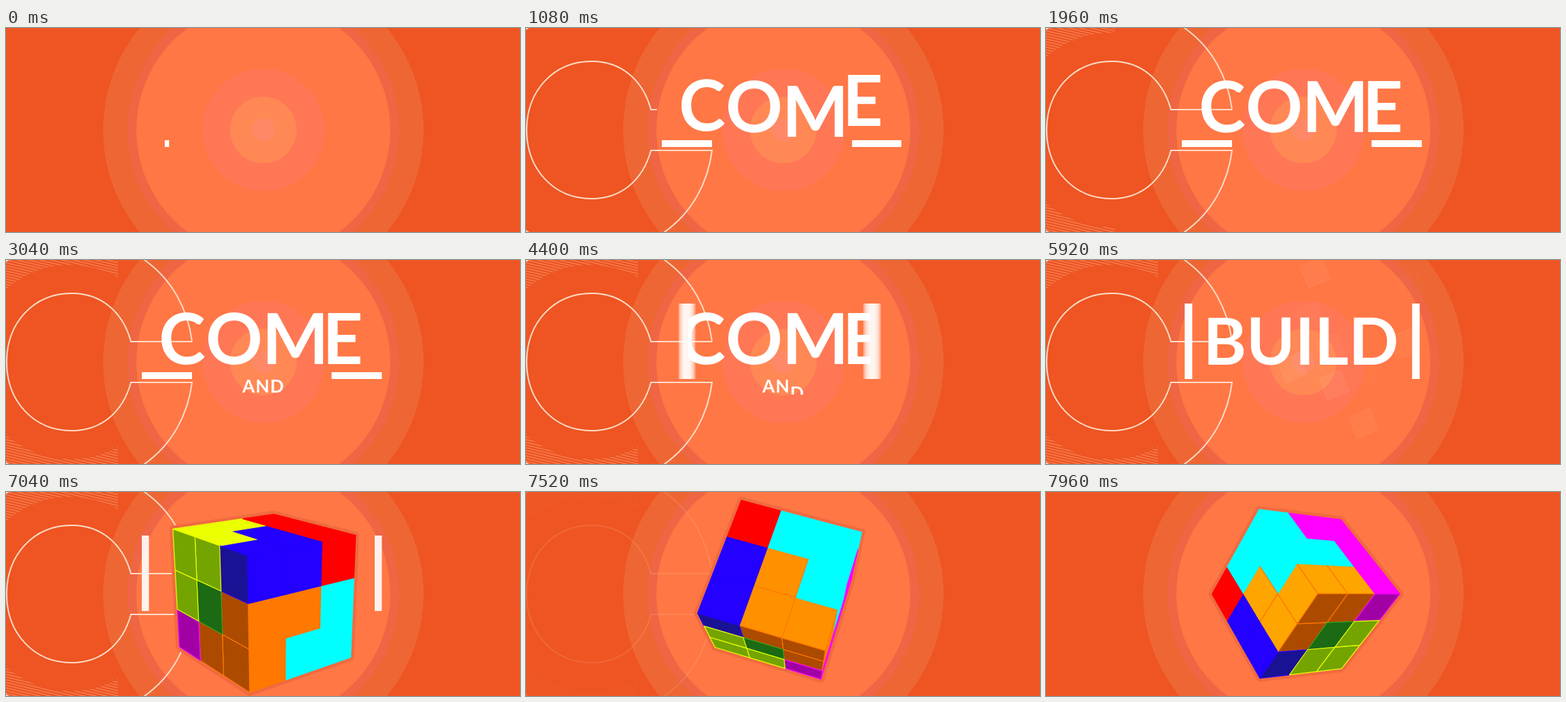
Write an HTML page with a canvas that moves like this. It is 757 by 300 pixels and loops after 8 s.

```html
<!DOCTYPE html>
<html lang="en">
<head>
<meta charset="utf-8">
<title>Come and build</title>
<style>
  html, body { margin: 0; width: 100%; height: 100%; overflow: hidden; background: #ee5522; }
  canvas { display: block; }
</style>
</head>
<body>
<canvas id="stage" width="757" height="300"></canvas>
<script>
const LOOP = 8000;
const ctx = document.getElementById('stage').getContext('2d');

const clamp = v => Math.min(1, Math.max(0, v));
const span = (t, from, to) => clamp((t - from) / (to - from));
const mix = (a, b, k) => a + (b - a) * k;
const easeInOut = k => (1 - Math.cos(Math.PI * k)) / 2;
const easeOut = k => 1 - (1 - k) ** 3;
const ring = (x, decay, period) => Math.exp(-x / decay) * Math.cos(2 * Math.PI * x / period);

function layer(alpha, draw) {
  if (alpha <= 0) return;
  ctx.save();
  ctx.globalAlpha = alpha;
  draw();
  ctx.restore();
}

function clipRect(x, y, w, h) {
  ctx.beginPath();
  ctx.rect(x, y, w, h);
  ctx.clip();
}

// Places a glyph by the left edge of its ink.
function glyph(char, left, baseline) {
  ctx.fillText(char, left + ctx.measureText(char).actualBoundingBoxLeft, baseline);
}

const setFont = size => { ctx.font = `700 ${size}px Lato, sans-serif`; };

/* ---------- backdrop ---------- */

const DISCS = [[236, '#ee6633'], [200, '#ee6644'], [187, '#ff7744'],
               [90, '#ff7755'], [49, '#ff8855'], [17, '#ff8866']];

function drawBackdrop() {
  ctx.fillStyle = '#ee5522';
  ctx.fillRect(0, 0, 757, 300);
  for (const [radius, color] of DISCS) {
    ctx.fillStyle = color;
    ctx.beginPath();
    ctx.arc(379, 150, radius, 0, 7);
    ctx.fill();
  }
}

/* ---------- outlined C and hatching ---------- */

const OUTLINE_LENGTH = 1815;
const outline = new Path2D('M274 120H184C172 76 140 49 97 49C40 49 1 93 1 150' +
  'C1 207 40 251 97 251C140 251 172 224 184 180H274C268 227 245 271 204 300' +
  'C90 380-86 290-86 150C-86 10 90-80 204 0C245 29 268 73 274 120');

function drawOutline(t) {
  const k = easeInOut(span(t, 200, 1480));
  if (!k) return;
  ctx.strokeStyle = '#ffdcc8';
  ctx.lineWidth = 2;
  if (k < 1) {
    const start = mix(367, 0, k), end = mix(367, OUTLINE_LENGTH, k);
    ctx.setLineDash([end - start, 4000]);
    ctx.lineDashOffset = -start;
  }
  ctx.stroke(outline);
}

function drawHatching(t) {
  const k = easeInOut(span(t, 1300, 2450));
  if (!k) return;
  clipRect(0, 0, 165 * k, 300);
  ctx.beginPath();
  ctx.rect(0, 0, 165, 300);
  ctx.arc(95, 150, 143, 0, 2 * Math.PI);
  ctx.clip('evenodd');
  ctx.strokeStyle = 'rgba(255,205,180,.6)';
  ctx.lineWidth = 0.8;
  ctx.beginPath();
  for (let y = -48; y < 300; y += 4) {
    ctx.moveTo(0, y);
    ctx.lineTo(165, y + 40);
  }
  ctx.stroke();
}

/* ---------- bars ---------- */

const TRAVEL = 166;

// How far a bar has moved inwards from its outer place.
function inset(t, closeAt, openAt) {
  const closing = easeInOut(span(t, closeAt, closeAt + 500));
  const opening = t < openAt ? 1 : Math.exp((openAt - t) / 325);
  return TRAVEL * Math.min(closing, opening);
}
const leftEdge = t => 200 + inset(t, 4240, 4740);
const rightEdge = t => 553.5 - inset(t, 4224, 4640);

function drawBars(t) {
  ctx.fillStyle = '#fff';
  if (t < 3600) {
    for (const [center, start] of [[237, -12], [516.5, 480]]) {
      if (t < start) continue;
      const w = 74 * (1 - ring(t - start, 160, 640));
      ctx.fillRect(center - w / 2, 165, w, 10);
    }
  } else if (t < 4200) {
    const w = mix(74, 10.5, easeInOut(span(t, 3600, 3900)));
    const h = mix(10, 111, easeInOut(span(t, 3800, 4200)));
    ctx.fillRect(200, 175 - h, w, h);
    ctx.fillRect(553.5 - w, 175 - h, w, h);
  } else if (t < 6320) {
    ctx.globalAlpha *= 0.4;
    for (let s = 0; s < 8; s++) {
      const past = t - s * 5;
      ctx.fillRect(leftEdge(past), 64, 10.5, 111);
      ctx.fillRect(rightEdge(past) - 10.5, 64, 10.5, 111);
    }
  } else {
    ctx.fillRect(200, 64, 10.5, 111);
    ctx.fillRect(543, 64, 10.5, 111);
  }
}

/* ---------- words ---------- */

function drawCome(t) {
  if (t > 4690) return;
  if (t < 4200) clipRect(0, 0, 757, 170);
  else clipRect(leftEdge(t), 0, rightEdge(t) - leftEdge(t), 300);
  setFont(104);
  ctx.fillStyle = '#fff';
  [['C', 229], ['O', 297], ['M', 385], ['E', 474]].forEach(([char, left], i) => {
    const x = t - 343 - i * 140;
    if (x < 0) return;
    const shift = x > 1400 ? 0 : 100 * ring(x, 178, 480);
    glyph(char, left, 153 + shift);
  });
}

function drawAnd(t) {
  if (t < 2480 || t > 5280) return;
  clipRect(290, 172, 190, 26);
  setFont(26.5);
  ctx.fillStyle = '#fff';
  const away = 1 - easeOut(span(t, 2480, 3040));
  const fade = 1 - 0.5 * span(t, 4400, 5120);
  for (const [char, left, spread, exit] of
       [['A', 347, -44, 4620], ['N', 369.5, 11, 5050], ['D', 391, 66, 4310]]) {
    const drop = 26 * easeInOut(span(t, exit, exit + 220));
    ctx.globalAlpha = (1 - away) * fade;
    glyph(char, left + spread * away, 195 + drop);
  }
}

function drawBuild(t) {
  if (t < 4860 || t > 7040) return;
  const left = leftEdge(t), right = rightEdge(t);
  const size = 72 * (right - left - 21) / 242;
  const fade = 1 - span(t, 6880, 7020);
  setFont(size);
  ctx.fillStyle = '#fff';
  const word = 'BUILD';
  const from = (left + right) / 2 - 2 - ctx.measureText(word).width / 2;
  [...word].forEach((char, i) => {
    const start = 4880 + Math.abs(i - 2) * 100;
    ctx.globalAlpha = span(t, start, start + 130) * fade;
    ctx.fillText(char, from + ctx.measureText(word.slice(0, i)).width, 119 + size * 0.36);
  });
}

/* ---------- flying squares: x, y, opacity ---------- */

const SQUARES = [[391, 49, .3], [491, 62, .1], [386, 95, .12], [484, 124, .25], [367, 149, .3],
                 [411, 167, .3], [442, 207, .25], [407, 128, .2], [449, 155, .06]];

function drawSquares(t) {
  if (t < 4760 || t > 6080) return;
  const reach = (1 - Math.exp((4760 - t) / 300)) / (1 - Math.exp(-1.2));
  const fade = span(t, 4760, 4960) * (1 - span(t, 5250, 6050));
  SQUARES.forEach(([x, y, alpha]) => {
    ctx.save();
    ctx.translate(mix(378, x, reach), mix(125, y, reach));
    ctx.rotate(-0.38);
    ctx.globalAlpha = fade;
    ctx.fillStyle = `rgba(255,255,255,${alpha})`;
    ctx.strokeStyle = `rgba(255,225,205,${alpha * 1.8})`;
    ctx.lineWidth = 1;
    ctx.fillRect(-17, -17, 34, 34);
    ctx.strokeRect(-17, -17, 34, 34);
    ctx.restore();
  });
}

/* ---------- puzzle cube ---------- */

// Piece of each small cube: CELLS[b][c][a] along the cube's three axes.
const CELLS = [['OOM', 'CCM', 'CMM'], ['OGY', 'OGG', 'CGR'], ['BYY', 'BBY', 'RRR']];
// Colour of each piece in light and in shade.
const PIECES = {
  O: ['#ff7800', '#ac4a00'], M: ['#ff00ff', '#a000a4'], C: ['#00ffff', '#00a6a6'],
  Y: ['#ebff00', '#74a400'], G: ['#2da019', '#1c6a14'], B: ['#2300ff', '#1a1294'],
  R: ['#ff0000', '#a60000']
};
const DEPTH = 900;
// Screen directions (right, down, away) of the cube's axes.
const AXES = [[-.602, -.258, .757], [-.005, -.948, -.317], [.798, -.188, .575]];
const SPIN = [-.13, .415, -.9];
const SPIN_ANGLE = 2.6;

const dot = (u, v) => u[0] * v[0] + u[1] * v[1] + u[2] * v[2];
const cross = (u, v) => [u[1] * v[2] - u[2] * v[1], u[2] * v[0] - u[0] * v[2], u[0] * v[1] - u[1] * v[0]];

function rotate(v, angle) {
  const c = Math.cos(angle), s = Math.sin(angle), side = cross(SPIN, v), d = dot(SPIN, v);
  return v.map((n, i) => n * c + side[i] * s + SPIN[i] * d * (1 - c));
}

function tracePolygon(points) {
  ctx.beginPath();
  points.forEach(p => ctx.lineTo(p[0], p[1]));
  ctx.closePath();
}

function drawCube(t) {
  const k = (t - 7040) / 920;
  const side = t < 7040 ? mix(130, 186, easeOut(span(t, 6880, 7040))) : mix(186, 164, easeInOut(clamp(k)));
  const axes = AXES.map(v => rotate(v, SPIN_ANGLE * k));
  const project = grid => {
    const p = [0, 1, 2].map(i => side * grid.reduce((sum, g, n) => sum + (g / 3 - 0.5) * axes[n][i], 0));
    const zoom = DEPTH / (DEPTH + p[2]);
    return [378.5 + p[0] * zoom, 150 + p[1] * zoom];
  };
  const area = q => (q[1][0] - q[0][0]) * (q[3][1] - q[0][1]) - (q[1][1] - q[0][1]) * (q[3][0] - q[0][0]);
  const faces = [];
  for (let axis = 0; axis < 3; axis++) {
    for (const level of [0, 3]) {
      const u = (axis + 1) % 3, v = (axis + 2) % 3;
      const quad = (i, j, n) => [[i, j], [i + n, j], [i + n, j + n], [i, j + n]].map(([x, y]) => {
        const grid = [0, 0, 0];
        grid[axis] = level; grid[u] = x; grid[v] = y;
        return project(grid);
      });
      const whole = quad(0, 0, 3);
      // With depth pointing away, a face turned to the viewer winds the other way.
      if (area(whole) * (level ? 1 : -1) < 0) faces.push({ axis, level, u, v, quad, whole });
    }
  }

  ctx.lineJoin = 'round';
  ctx.strokeStyle = '#f06a40';
  ctx.lineWidth = 10;
  for (const face of faces) {
    tracePolygon(face.whole);
    ctx.stroke();
  }

  for (const { axis, level, u, v, quad } of faces) {
    const shaded = axis === 2 && !level;
    for (let i = 0; i < 3; i++) for (let j = 0; j < 3; j++) {
      const cell = [0, 0, 0];
      cell[axis] = level ? 2 : 0; cell[u] = i; cell[v] = j;
      const piece = CELLS[cell[1]][cell[2]][cell[0]];
      const [light, dark] = PIECES[piece];
      const warm = `rgb(255,${Math.round(mix(120, 165, clamp(k)))},0)`;
      tracePolygon(quad(i, j, 1));
      ctx.fillStyle = shaded ? dark : piece === 'O' ? warm : light;
      ctx.fill();
      ctx.strokeStyle = light;
      ctx.lineWidth = 1.2;
      ctx.stroke();
    }
  }
}

/* ---------- timeline ---------- */

function render(t) {
  ctx.globalAlpha = 1;
  drawBackdrop();
  const lineFade = 1 - span(t, 7040, 7600);
  layer(lineFade, () => drawHatching(t));
  layer(lineFade, () => drawOutline(t));
  layer(1, () => drawSquares(t));
  layer(1, () => drawCome(t));
  layer(1, () => drawAnd(t));
  layer(1, () => drawBuild(t));
  layer(1 - span(t, 7010, 7310), () => drawBars(t));
  layer(span(t, 6880, 7020), () => drawCube(t));
}

const begin = performance.now();
function tick() {
  render((performance.now() - begin) % LOOP);
  requestAnimationFrame(tick);
}
tick();
</script>
</body>
</html>
```
